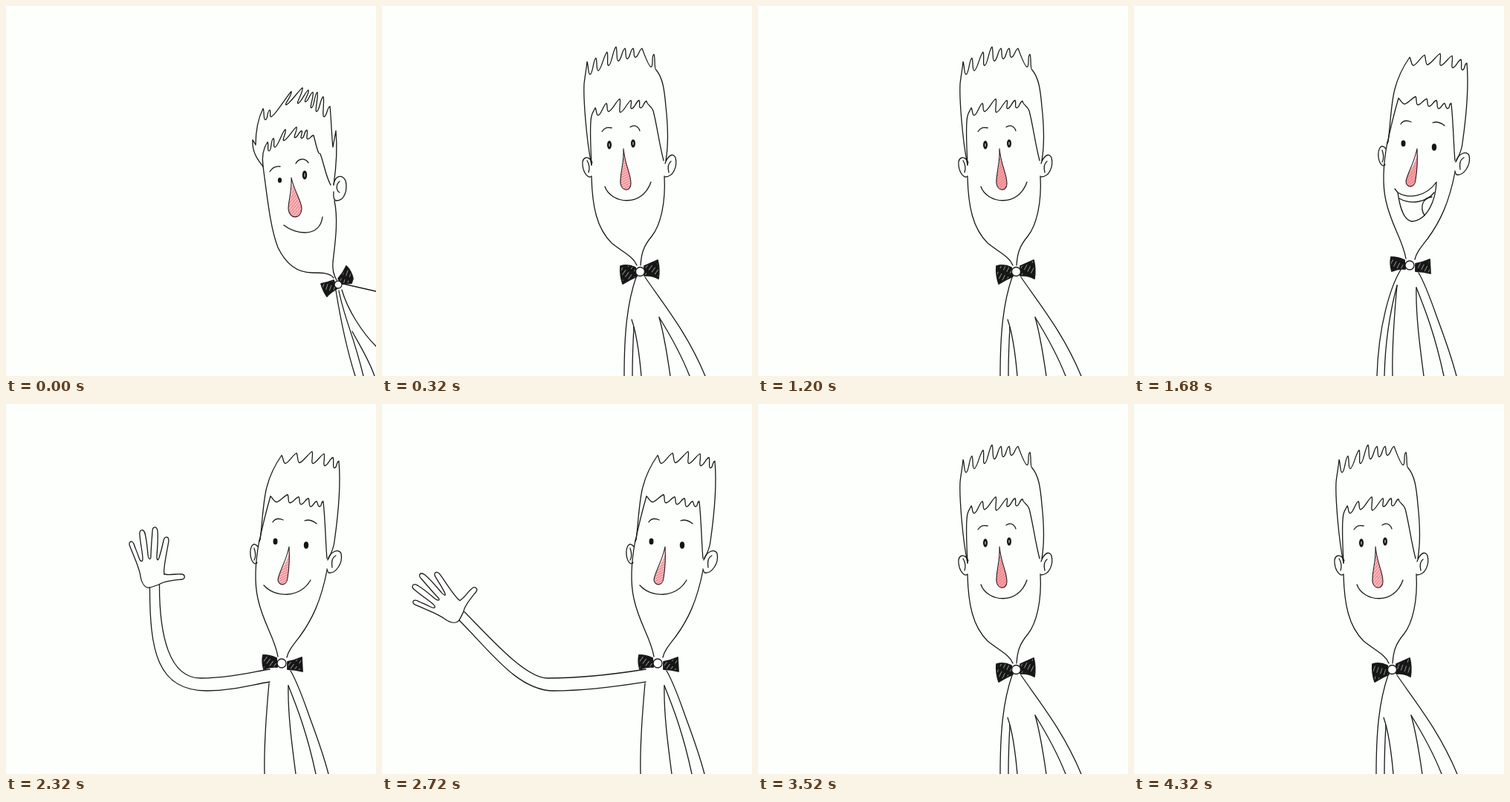
Recreate the animation shown at these times as an HTML page. Size 498 by 498 pixels, loop 4.4 s.

```html
<!DOCTYPE html>
<html lang="en">
<head>
<meta charset="utf-8">
<title>Waving man</title>
<style>
html, body { margin: 0; width: 100%; height: 100%; overflow: hidden; background: #fdfffd; }
svg { display: block; width: 100vw; height: 100vh; }
svg path, svg circle { fill: none; stroke: #1a1a1a; stroke-width: 1.3; stroke-linecap: round; stroke-linejoin: round; }
.nose path { fill: url(#red); stroke: none; }
.nose .bridge { fill: none; stroke: #2a1a1c; stroke-width: 1.1; }
.bow path { fill: url(#ink); stroke-width: 1.8; }
.bow circle { fill: #fdfffd; }
.eye { fill: #141414; }
.glint { fill: #aaa; }
</style>
</head>
<body>
<svg id="stage" viewBox="0 0 498 498">
  <defs>
    <pattern id="ink" width="5" height="13" patternUnits="userSpaceOnUse">
      <rect width="5" height="13" fill="#161616"/>
      <rect x="2" y="1" width=".6" height="8" fill="#ddd"/>
    </pattern>
    <pattern id="red" width="3" height="3" patternUnits="userSpaceOnUse">
      <rect id="wash" width="3" height="3" fill="#fbc6c8"/>
      <rect width="1.3" height="3" fill="#ee7c85"/>
    </pattern>
  </defs>
</svg>
<script>
const STEP = 80;
const LOOP = 4400;
const stage = document.getElementById('stage');
const ink = document.getElementById('ink');
const red = document.getElementById('red');
const wash = document.getElementById('wash');

const line = d => `<path d="${d}"/>`;
const group = (cls, body, more = '') => `<g class="${cls}" ${more}>${body}</g>`;

// Hair line: lead ends at the first tip, then valleys and tips alternate.
function hair(lead, points, tail) {
  const p = points.split(' ').map(s => s.split(',').map(Number));
  let d = lead;
  for (let i = 1; i < p.length; i++) {
    const [ax, ay] = p[i - 1], [bx, by] = p[i];
    const h = by - ay;
    d += i % 2
      ? `C${ax + 2},${ay + h * .2} ${bx - 3},${by} ${bx},${by}`
      : `C${ax + 4},${ay} ${bx - 4},${by - h * .1} ${bx},${by}`;
  }
  return line(d + tail);
}

function eye(x, y, rx, ry, glint) {
  const oval = (cls, a, b) => `<ellipse class="${cls}" cx="${x}" cy="${y}" rx="${a}" ry="${b}"/>`;
  return oval('eye', rx, ry) + (glint ? oval('glint', .8, ry * .45) : '');
}

const nose = (drop, bridge) => group('nose', line(drop) + `<path class="bridge" d="${bridge}"/>`);
const bow = (left, right, x, y, r) =>
  group('bow', line(left) + line(right) + `<circle cx="${x}" cy="${y}" r="${r}"/>`);

const lean =
  hair('M346,216C337,205 331,195 332,180L336,187C336,168 340,150 346,138',
    '346,138 349,153 355,140 357,149 384,115 377,133 399,110 393,131 407,113 403,129 413,116 411,137 419,116 418,142 427,122 428,149 436,135',
    'C438,155 438,172 440,190L444,168C446,190 444,220 441,241') +
  hair('M346,216C344,202 346,192 352,183',
    '352,183 354,195 360,178 362,190 376,166 374,181 391,163 389,177 398,168 398,178 405,167 406,179 414,174',
    'C417,185 418,192 421,198L423,199C428,212 430,228 437,241') +
  line('M346,216C352,260 356,300 366,325C378,350 395,359 412,359C425,359 436,359 441,366') +
  line('M442,262C448,290 442,325 440,345C439,355 441,362 445,369') +
  line('M441,240C443,228 452,226 457,235C460,247 456,262 445,262C442,262 440,258 441,250') +
  line('M449,236C444,240 444,248 449,251') +
  eye(368.5, 234.5, 2.6, 3.6) + eye(402, 227.5, 3.2, 6, true) +
  line('M355,223C358,218 362,215 369,216') + line('M390,212C394,205 402,204 407,211') +
  nose('M385,244C385,254 380,264 380,273C381,287 397,288 398,273C398,263 389,252 386,240Z',
    'M384,231C385,250 380,262 380,273C381,287 397,288 398,273C398,262 388,250 384,231') +
  line('M374,295C390,308 422,312 426,284') +
  bow('M424,374Q433,372 441,369L445,381Q437,385 432,391Q427,384 424,374Z',
    'M447,367Q454,359 458,350Q465,357 467,367L465,373L453,374Z', 447, 375, 5) +
  line('M454,374L498,384') +
  line('M452,382C460,410 480,440 498,458') +
  line('M444,383C450,420 458,460 470,498') +
  line('M448,383C455,420 467,440 481,498') +
  line('M466,438C475,455 488,475 496,498');

const frontHair =
  hair('M282,214C275,180 271,125 272,105C273,95 275,86 276,75',
    '276,75 280,92 288,70 291,87 303,62 305,80 315,55 318,74 327,57 330,71 338,57 341,69 350,57 362,82 366,65 369,86',
    'C378,97 380,112 382,135C385,162 386,185 382,208') +
  hair('M282,214C281,190 279,160 282,148C283,143 286,140 287,137',
    '287,137 291,147 302,131 305,142 320,125 321,143 335,127 336,138 346,127 348,137 356,128',
    'C357,134 362,133 365,141C370,160 373,185 379,208');
const frontEars =
  line('M283,211C278,200 269,203 270,214C271,225 278,233 282,229') +
  line('M276,208C279,213 280,218 278,224') +
  line('M381,212C384,203 391,196 395,204C398,216 392,230 381,230') +
  line('M389,209C384,213 385,220 386,224');
const frontFace =
  line('M282,230C283,270 289,299 309,319C325,332 338,337 343,349') +
  line('M380,229C382,265 375,295 363,310C351,324 349,335 348,349');
const frontBody =
  nose('M325,206C325,220 320,229 321,239C323,251 335,250 335,239C335,228 329,218 326,203Z',
    'M325,192C326,213 320,226 321,239C323,250 335,250 335,239C335,225 327,215 325,192') +
  bow('M321,350Q331,347 341,352L343,364Q334,368 324,374Q320,362 321,350Z',
    'M353,350Q362,346 371,342Q374,354 372,367Q363,362 353,363Z', 347.5, 357.5, 6) +
  line('M342,365C330,400 326,440 326,498') +
  line('M354,365C378,400 411,440 435,498') +
  line('M336,422C344,445 347,475 349,498') +
  line('M339,432C338,450 337,470 337,498') +
  line('M373,419C379,440 384,470 388,498') +
  line('M373,419C388,443 403,470 414,498');

const front = frontHair + frontEars + frontFace + frontBody +
  eye(306, 187, 3, 5.8, true) + eye(338, 185, 3, 5.5, true) +
  line('M296,169C300,163 304,163 309,164') + line('M334,163C340,159 345,162 347,168') +
  line('M300,243C308,266 350,272 362,237');

const wide = 'transform="translate(331 360) scale(1.04 .988) translate(-331 -360)"';
const squint = group('', frontHair + frontEars + frontFace, wide) + frontBody +
  eye(306, 196, 4.5, 2.2) + eye(341.5, 193.5, 4.5, 2.4) +
  line('M300,196C303,193 308,193 312,195') + line('M336,193C340,190 345,191 347,194') +
  line('M296,179C300,173 304,173 308,174') + line('M337,174C345,169 352,171 354,175') +
  line('M293,247C315,264 348,263 367,237');

const aside =
  hair('M342,183C345,160 346,130 351,112C355,96 362,82 371,69',
    '371,69 376,80 391,66 395,79 412,64 413,80 428,67 429,83 440,72 442,86 448,77',
    'C451,110 447,150 442,185C441,195 437,202 434,208') +
  hair('M341,185C345,165 350,145 356,124',
    '356,124 364,132 379,122 382,133 394,125 397,135 407,127 410,138 418,131 422,138 427,131',
    'C430,160 430,185 432,208') +
  line('M341,183C336,210 334,240 339,262C346,295 362,315 366,340') +
  line('M432,224C424,265 412,290 396,312C386,325 380,332 378,341') +
  line('M339,192C333,184 328,192 329,203C330,213 336,218 338,213') +
  line('M334,194C336,200 337,205 334,210') +
  line('M433,210C436,199 447,194 451,201C454,215 443,229 434,227Q432,224 432,222') +
  line('M444,204C438,207 438,214 439,220') +
  eye(362.5, 185, 3, 4.2) + eye(404, 190, 3.2, 4.8) +
  line('M359,159C362,154 366,153 373,156') + line('M402,157C408,155 413,157 418,161') +
  nose('M380,204C376,217 368,226 366,236C366,245 378,246 379,234C381,222 382,210 381,198Z',
    'M381,192C377,212 368,225 366,236C366,245 378,246 379,234C381,222 382,208 381,192') +
  bow('M346,338Q355,338 364,342L365,354Q356,353 347,357Q344,347 346,338Z',
    'M379,347Q389,345 398,341L399,360Q389,357 379,357Z', 371, 349, 6) +
  line('M383,359C394,378 402,403 410,425C420,452 428,475 434,498') +
  line('M380,379C392,409 405,442 417,498') +
  line('M380,379C379,415 385,460 390,498') +
  line('M354,376C350,420 347,460 348,498');

const smile = line('M347,244C362,261 395,262 410,237');
const laugh =
  line('M351,246L355,251C369,260 393,257 407,237C406,262 395,288 374,290C361,288 357,265 355,251') +
  line('M357,259C373,268 394,264 404,251') +
  line('M401,257C389,258 384,270 391,282');
const armDown = line('M359,355C345,378 329,430 327,498') + line('M354,376C345,410 338,450 337,498');

const hand =
  line('M213,229C211,222 217,198 219,184C219,177 213,178 212,184C210,193 208,201 206,207C204,212 203,210 203,204C204,190 205,180 204,171C203,164 197,164 197,172C196,185 195,198 195,205C195,210 192,210 191,203C190,190 189,182 187,174') +
  line('M187,174C185,167 179,169 180,176C181,190 184,200 184,208C184,213 181,213 179,207C176,198 173,192 172,188C169,182 164,186 167,192C174,210 180,222 181,232C183,243 188,248 194,247L206,243') +
  line('M206,243C212,238 228,237 237,236C242,235 241,229 236,229C228,228 222,231 213,229');

// An arm is a wrist position and a hand turn in degrees.
function arm(x, y, turn) {
  const a = turn * Math.PI / 180, c = Math.cos(a), s = Math.sin(a);
  const bend = (386 - y) / 139;
  const elbow = x - turn * 1.2;
  const at = (u, v) => `${x + u * c - v * s},${y + u * s + v * c}`;
  const edge = (u, v, reach, pull, ex, ey, endY) =>
    line(`M${at(u, v)}C${at(u, v + reach * bend)} ${ex - pull * bend},${ey} ${ex},${ey}` +
      `C${ex + (355 - ex) * .4},${ey} 330,${endY + 4} 355,${endY}`);
  return edge(-6.5, 2, 83, 66, elbow + 70, 386, 374) +
    edge(6.5, -1, 66, 42, elbow + 62, 369, 357) +
    group('', hand, `transform="translate(${x - 200} ${y - 245}) rotate(${turn} 200 245)"`);
}

const greet = (...wrist) => aside + smile + arm(...wrist);
const poses = {
  L: lean,
  F: front,
  S: squint,
  C: aside + smile + armDown,
  H: aside + laugh + armDown,
  a: greet(241, 330, -10),
  b: greet(199, 300, -20),
  N: greet(200, 245, 0),
  M: greet(152, 258, -22),
  W: greet(107, 285, -45)
};

// Pose and number of steps it stays.
const order = 'L3 F5 S3 F5 C2 H5 a2 b2 N4 M1 W3 M1 N3 M1 W1 M1 a1 F7 S3 F2'
  .split(' ').flatMap(s => Array(+s.slice(1)).fill(s[0]));

const layers = {};
for (const key in poses) {
  const g = document.createElementNS('http://www.w3.org/2000/svg', 'g');
  g.innerHTML = poses[key];
  layers[key] = stage.appendChild(g);
}

let shown = -1;
function draw() {
  const step = Math.floor(performance.now() % LOOP / STEP);
  if (step !== shown) {
    shown = step;
    for (const key in layers) layers[key].style.display = key === order[step] ? '' : 'none';
    const boil = Math.floor(step / 2) % 3;
    ink.setAttribute('patternTransform', `translate(${boil * 2} ${boil * 3}) rotate(${18 + boil * 9})`);
    red.setAttribute('patternTransform', `rotate(${40 + boil * 12})`);
    wash.setAttribute('fill', boil === 1 ? '#f7a9ad' : '#fbc6c8');
  }
  requestAnimationFrame(draw);
}
draw();
</script>
</body>
</html>
```
